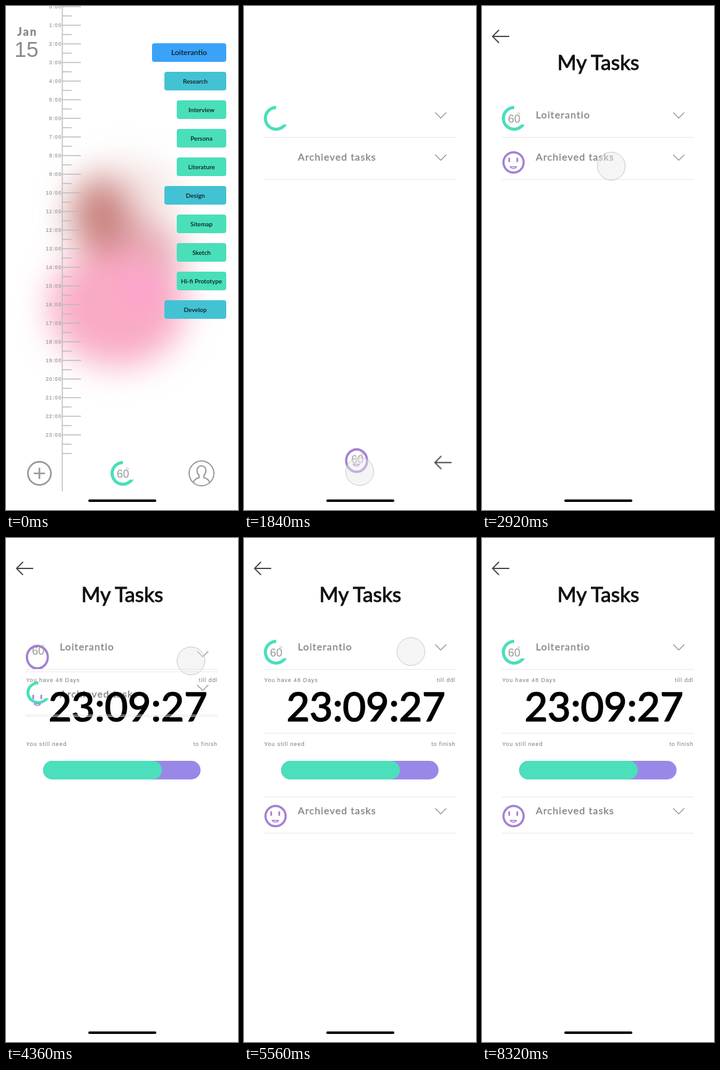
An HTML page that plays this animation: 375x812 px, repeating every 9.6 s.

```html
<!DOCTYPE html>
<html lang="en">
<head>
<meta charset="utf-8">
<title>Task planner</title>
<style>
html, body { margin: 0; width: 100%; height: 100%; overflow: hidden; background: #fff; }
svg { display: block; width: 100vw; height: 100vh; overflow: hidden; }
filter { color-interpolation-filters: sRGB; }
text { font-family: Lato, "Open Sans", sans-serif; }
.arial, .hour, .note { font-family: "Liberation Sans", Arial, sans-serif; font-weight: 400; }
.hour { font-size: 9px; font-weight: 700; letter-spacing: .6px; fill: #aaa; text-anchor: end; }
.note { font-size: 9px; letter-spacing: .9px; fill: #777; }
.tag { font-size: 10px; font-weight: 600; text-anchor: middle; fill: #0d1a1c; }
.medium { fill: currentColor; stroke: currentColor; stroke-width: .027em; }
.row { font-size: 16px; letter-spacing: 1.1px; color: #888; }
.icon { fill: none; stroke: #999; }
.rule { fill: #e8e8e8; }
#tasks, #detail { opacity: 0; }
</style>
</head>
<body>
<svg viewBox="0 0 375 812">
  <defs>
    <filter id="soft" x="-100%" y="-100%" width="300%" height="300%"><feGaussianBlur stdDeviation="27"/></filter>
    <filter id="mild" x="-100%" y="-100%" width="300%" height="300%"><feGaussianBlur stdDeviation="18"/></filter>
    <path id="gauge" fill="#49dfbb" d="M20 0A20 20 0 1 0 37.3 30H31.2A15 15 0 1 1 20 5Z"/>
    <g id="percent" fill="#999">
      <text class="arial" y="6.5" font-size="18" text-anchor="middle">60</text>
      <text class="arial" x="5" y="-6" font-size="5.5" fill="#aaa">%</text>
    </g>
    <path id="chevron" class="icon" stroke-width="1.5" d="M309-4.5L318 4.5L327-4.5"/>
  </defs>

  <g id="plan">
    <g filter="url(#soft)">
      <ellipse cx="195" cy="300" rx="85" ry="50" fill="#d9a5a3" opacity=".28"/>
      <ellipse cx="220" cy="405" rx="64" ry="62" fill="#dc959f" opacity=".8"/>
      <ellipse cx="180" cy="484" rx="110" ry="96" fill="#f9aac4"/>
      <ellipse cx="152" cy="338" rx="48" ry="60" fill="#c57976" opacity=".92"/>
    </g>
    <ellipse cx="214" cy="456" rx="36" ry="30" fill="#fca2cf" opacity=".75" filter="url(#mild)"/>
    <g id="scale" stroke="#bbb" stroke-width="1.5"></g>
    <g id="hours"></g>
    <text x="18" y="48" font-size="18" style="font-weight:900;letter-spacing:2px" fill="#8a8a8a">Jan</text>
    <text class="arial" x="13.5" y="82" font-size="35" fill="#8a8a8a">15</text>
    <g id="tags"></g>
    <g class="icon" transform="translate(54 753)" stroke-width="2.7">
      <circle r="18.6"/><path d="M-9 0H9M0-9V9"/>
    </g>
    <g class="icon" transform="translate(316 753)" stroke-width="2">
      <circle r="20"/>
      <path d="M-13 15Q-12 9-4 7V3Q-8-1-7-6Q-6-12 0-12Q6-12 7-6Q8-1 4 3V7Q12 9 13 15"/>
    </g>
    <use href="#gauge" x="169" y="733"/>
    <use href="#percent" x="189" y="753"/>
  </g>

  <g id="tasks">
    <text id="title" class="medium" x="188" y="103" font-size="33.3" text-anchor="middle" color="#111">My Tasks</text>
    <text id="name" class="row medium" x="87" y="181">Loiterantio</text>
    <text id="done" class="row medium" x="87" y="6">Archieved tasks</text>
    <use id="chevA" href="#chevron"/>
    <use id="chevB" href="#chevron"/>
    <use id="ringA" href="#gauge"/>
    <circle id="ringB" cx="18" cy="18" r="16.3" fill="none" stroke="#a07bd2" stroke-width="3.4"/>
    <g id="face" fill="none" stroke="#a07bd2">
      <path id="eyes" stroke-width="2.6" d="M-7-7.5V-.5M6-7.5V-.5"/>
      <path stroke-width="1.3" d="M-5.5 7H4.8Q3.5 9.8-.3 9.8Q-4 9.8-5.5 7Z"/>
    </g>
    <use id="score" href="#percent"/>
    <g id="detail">
      <text class="note" x="32.5" y="232">You have 48 Days</text>
      <text class="note" x="342" y="232" text-anchor="end">till ddl</text>
      <text class="medium" x="197" y="294.5" font-size="64.5" text-anchor="middle">23:09:27</text>
      <text class="note" x="32.5" y="335">You still need</text>
      <text class="note" x="342" y="335" text-anchor="end">to finish</text>
      <rect x="60" y="359" width="254.5" height="30" rx="15" fill="#9a88e8"/>
      <rect x="60" y="359" width="192" height="30" rx="15" fill="#4bdfbb"/>
    </g>
    <g id="rules"></g>
    <path id="back" fill="none" stroke="#484848" stroke-width="1.8" d="M28 11H1M11.5 .5L1 11L11.5 21.5"/>
  </g>

  <rect x="133" y="795" width="110" height="4" rx="2"/>
  <circle id="touch" r="22.5" fill="#e8e8e8" fill-opacity=".45" stroke="#c6c6c6"/>
</svg>
<script>
const LOOP = 9600, OPEN = 1820, SHOWN = 1840, EXPAND = 4340, MOVE = 360;
const $ = id => document.getElementById(id);

function add(parent, tag, attrs, text = '') {
  const el = document.createElementNS('http://www.w3.org/2000/svg', tag);
  for (const k in attrs) el.setAttribute(k, attrs[k]);
  el.textContent = text;
  return parent.appendChild(el);
}

const line = (x1, y1, x2, y2) => add($('scale'), 'line', { x1, y1, x2, y2 });

// Time ruler
line(91, 0, 91, 782);
for (let h = 0; h <= 24; h++) {
  const y = 1 + 30 * h;
  line(91, y, h < 24 ? 121 : 106, y);
  if (h === 24) break;
  line(91, y + 15, 106, y + 15);
  add($('hours'), 'text', { class: 'hour', x: 90, y: y + 3 }, h + ':00');
}

// Task tags: level sets width and colour
const levels = [[120, '#3aa3f8'], [100, '#43c2d4'], [80, '#49dfb9']];
[['Loiterantio', 0], ['Research', 1], ['Interview', 2], ['Persona', 2], ['Literature', 2],
 ['Design', 1], ['Sitemap', 2], ['Sketch', 2], ['Hi-fi Prototype', 2], ['Develop', 1]
].forEach(([label, level], i) => {
  const [width, fill] = levels[level], y = 60 + 46 * i;
  add($('tags'), 'rect', { x: 356 - width, y, width, height: 30, rx: 4, fill });
  const text = add($('tags'), 'text', { class: 'tag', x: 356 - width / 2, y: y + 18.5 }, label);
  if (!level) text.style.fontSize = '12px';
});

function play(el, rows) {
  el.animate(rows.map(([ms, style, easing = 'linear']) => ({ offset: ms / LOOP, easing, ...style })),
    { duration: LOOP, iterations: Infinity });
}

const off = { opacity: 0 }, on = { opacity: 1 };
const showFrom = (el, ms) => play(el, [[0, off, 'step-end'], [ms, on], [LOOP, on]]);
const showUntil = (el, ms) => play(el, [[0, on, 'step-end'], [ms, off], [LOOP, off]]);

const place = ([x, y, sx = 1, sy = 1]) =>
  ({ transform: `translate(${x}px, ${y}px) scale(${sx}, ${sy})` });

// a to b when the list opens, c to d when the row expands
function shift(el, a, b, c = b, d = c) {
  [a, b, c, d] = [a, b, c, d].map(place);
  play(el, [[0, a], [OPEN, a, 'ease'], [OPEN + MOVE, b], [EXPAND, b],
    [EXPAND, c, 'ease'], [EXPAND + MOVE, d], [LOOP, d]]);
}

showUntil($('plan'), SHOWN);
showFrom($('tasks'), SHOWN);
showFrom($('detail'), EXPAND);
play($('eyes'), [[0, off], [OPEN, off, 'ease'], [OPEN + MOVE, on], [LOOP, on]]);

shift($('title'), [320, 0], [0, 0]);
shift($('name'), [320, 0], [0, 0]);
shift($('back'), [320, 754], [16, 38]);
shift($('done'), [0, 243], [0, 243], [0, 243], [0, 439]);
shift($('chevA'), [0, 176], [0, 176], [0, 244], [0, 176]);
shift($('chevB'), [0, 244], [0, 244], [0, 176], [0, 440]);
shift($('ringA'), [32, 161], [32, 161], [33, 234, .965, .9], [32, 164]);
shift($('ringB'), [169, 733, 1.036, 1.111], [33, 234], [32, 161, 1.036, 1.111], [33, 430]);
shift($('face'), [187.5, 752], [51, 252], [51, 252], [51, 448]);
shift($('score'), [189, 753], [52, 181], [52, 181], [52, 184]);
[[211, 211], [211, 314], [279, 417], [279, 475]].forEach(([from, to]) => {
  const rule = add($('rules'), 'rect', { class: 'rule', x: 32, width: 311, height: 1 });
  shift(rule, [0, from], [0, from], [0, from], [0, to]);
});

// Touch point: time, x, y, easing to the next row
play($('touch'), [
  [0, 313, -30], [320, 313, -30, 'ease-out'], [680, 160, 699],
  [880, 160, 699, 'ease'], [1200, 187, 750],
  [2400, 187, 750, 'ease'], [2920, 209, 258],
  [3440, 209, 258, 'ease-in-out'], [3640, 159, 222, 'ease-in-out'],
  [3940, 285, 191, 'ease-out'], [4060, 299, 198],
  [5280, 299, 198, 'ease-in'], [5560, 270, 183, 'ease'], [5880, 120, 132],
  [6860, 120, 132, 'ease-out'], [7360, 53, 65],
  [7880, 53, 65, 'ease-in'], [8320, 244, -30], [LOOP, 244, -30]
].map(([ms, x, y, easing]) => [ms, place([x, y]), easing]));
</script>
</body>
</html>
```
